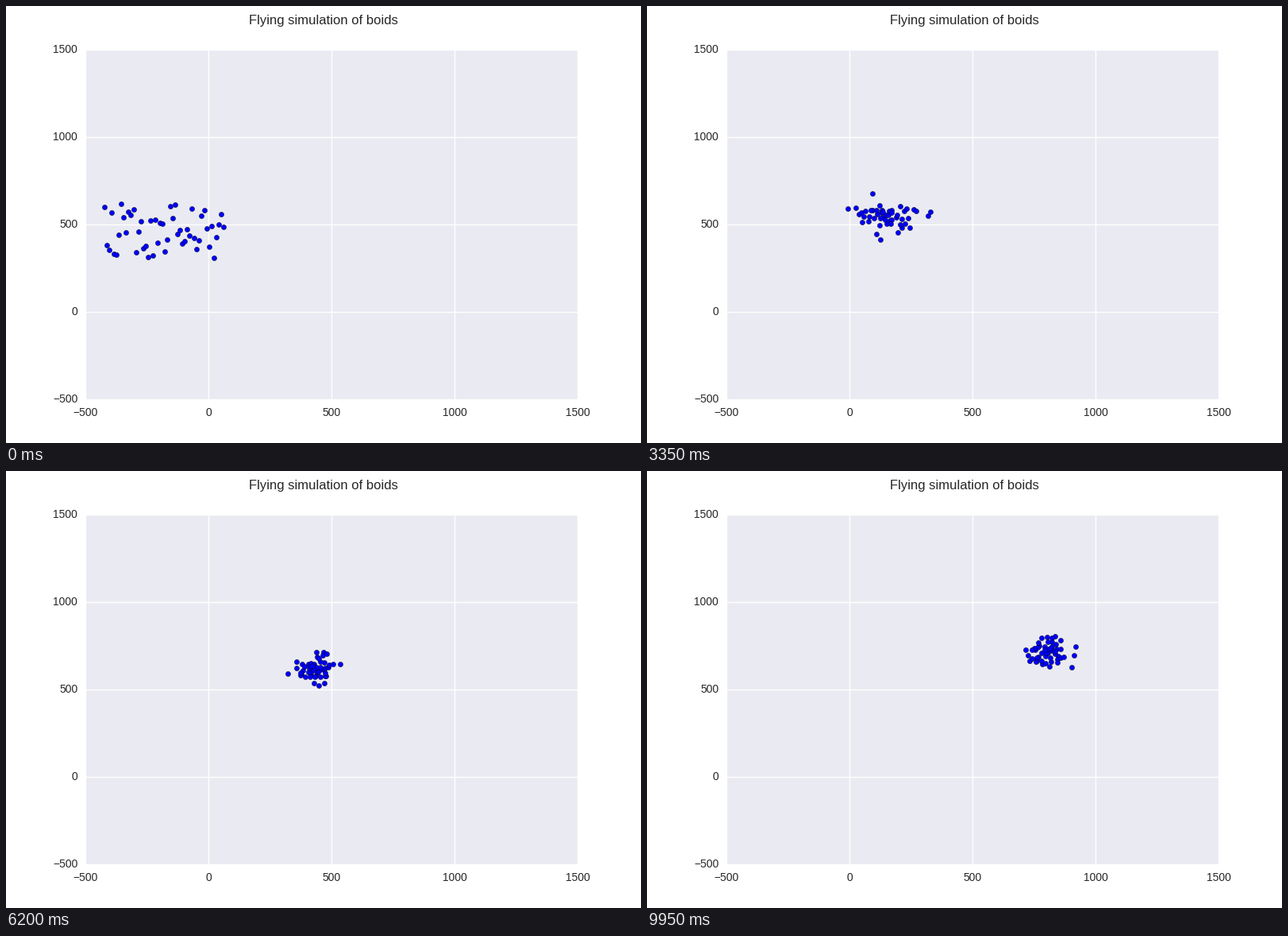
A matplotlib script that plays this animation: 800 px wide and 550 px high, repeating every 10000 ms.

```python
import numpy as np
import matplotlib.pyplot as plt
from matplotlib.animation import FuncAnimation

FRAMES, INTERVAL = 200, 50
BOIDS = 50
X_SPAN, Y_SPAN = (-430, 55), (300, 610)  # where the flock starts
CENTRE = np.array([-181, 463])
DRIFT = np.array([4.96, 1.26])  # mean flock velocity per frame
COHESION, ALIGNMENT, REPULSION = 0.01, 0.125, 0.8
CLEARANCE, SIGHT = 10, 100

plt.rcParams.update({
    "font.family": "Liberation Sans",
    "text.kerning_factor": 6,
    "text.color": "0.15",
    "xtick.labelcolor": "0.15",
    "ytick.labelcolor": "0.15",
})


def start(rng):
    """Spread the boids evenly over both spans, paired at random."""
    pos = np.column_stack([np.linspace(*X_SPAN, BOIDS),
                           rng.permutation(np.linspace(*Y_SPAN, BOIDS))])
    vel = rng.uniform((0, -20), (10, 20), pos.shape)
    return pos + CENTRE - pos.mean(axis=0), vel + DRIFT - vel.mean(axis=0)


def step(pos, vel):
    """Advance the flock: gather, avoid collisions, match speed, move."""
    gap = pos[:, None] - pos[None, :]
    dist = np.hypot(gap[..., 0], gap[..., 1])
    vel = vel + COHESION * (pos.mean(axis=0) - pos)
    vel += REPULSION * (gap * (dist < CLEARANCE)[..., None]).sum(axis=1)
    diff = vel[None, :] - vel[:, None]
    vel += ALIGNMENT * (diff * (dist < SIGHT)[..., None]).mean(axis=1)
    return pos + vel, vel


def fly():
    pos, vel = start(np.random.default_rng(12))
    path = [pos]
    for _ in range(FRAMES - 1):
        pos, vel = step(pos, vel)
        path.append(pos)
    return path


path = fly()

fig = plt.figure(figsize=(8, 5.5), dpi=100, facecolor="white")
ax = fig.add_axes([0.125, 0.1, 0.775, 0.8], facecolor="#EAEAF2")
ticks = range(-500, 1501, 500)
ax.set(xlim=(-500, 1500), ylim=(-500, 1500), xticks=ticks, yticks=ticks)
ax.set_axisbelow(True)
ax.grid(color="white", linewidth=1)
ax.tick_params(length=0, pad=7, labelsize=10)
for label in ax.get_yticklabels():
    label.set_verticalalignment("center")
for spine in ax.spines.values():
    spine.set_visible(False)
fig.suptitle("Flying simulation of boids", fontsize=12, y=0.98)

dots = ax.scatter(*path[0].T, s=20, c="blue", edgecolors="black",
                  linewidths=0.3, zorder=3)


def draw(i):
    dots.set_offsets(path[i])
    return (dots,)


anim = FuncAnimation(fig, draw, frames=FRAMES, interval=INTERVAL,
                     repeat=True, repeat_delay=0)
plt.show()
```
